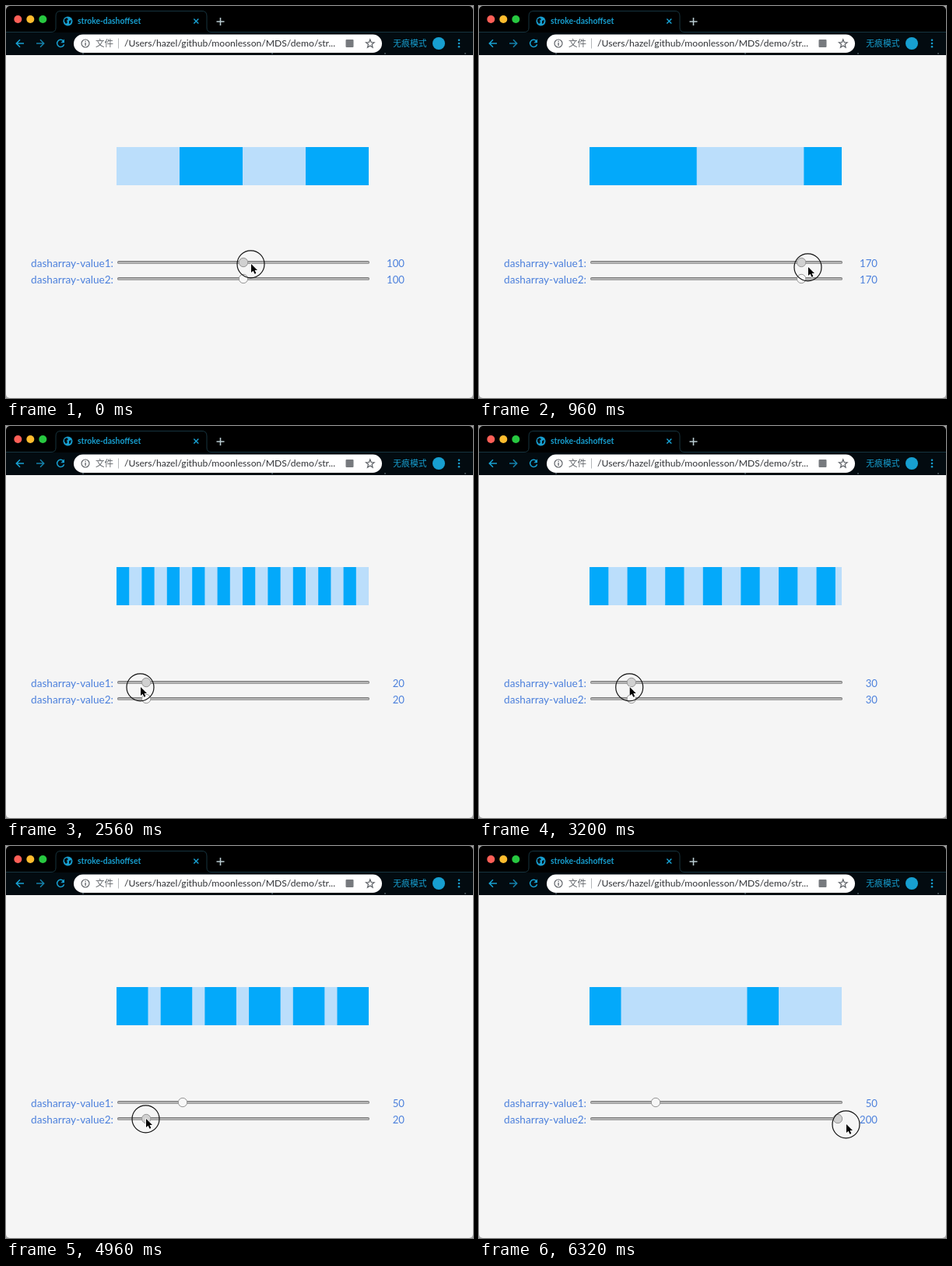
Recreate the animation shown at these times as an HTML page with a canvas. Size 600 by 503 pixels, loop 6400 ms.

```html
<!DOCTYPE html>
<html lang="zh">
<head>
<meta charset="utf-8">
<title>stroke-dashoffset</title>
<style>
html, body { margin: 0; width: 100%; height: 100%; overflow: hidden; background: #aaa; }
canvas { display: block; }
</style>
</head>
<body>
<canvas id="stage" width="600" height="503"></canvas>
<script>
const ctx = document.getElementById('stage').getContext('2d');
const LOOP = 6400, STEP = 80;
const TEAL = '#179fd0', LATIN = 'Lato, "Open Sans", sans-serif';
const CJK = '"Noto Sans CJK SC", "Noto Sans CJK", sans-serif';

// Keyframes: time, then the values at that time
const cursorPath = [
  [0, 315, 331], [960, 423, 335], [1280, 471, 336], [1360, 471, 336],
  [1840, 315, 334], [2560, 173, 335], [2720, 162, 335], [2960, 162, 335],
  [3520, 236, 335], [3840, 229, 342], [4160, 228, 350], [4960, 180, 350],
  [6240, 472, 357], [6400, 472, 357]
];
const dragBoth = [
  [0, 100], [960, 170], [1280, 200], [1360, 200], [1840, 110],
  [2560, 20], [2720, 10], [2960, 10], [3440, 50], [6400, 50]
];
const dragSecond = [[0, 50], [4240, 50], [4960, 20], [6240, 200], [6400, 200]];

function sample(keys, t) {
  const i = Math.max(1, keys.findIndex(k => k[0] >= t));
  const a = keys[i - 1], b = keys[i];
  const p = (t - a[0]) / (b[0] - a[0]);
  return a.slice(1).map((v, n) => v + (b[n + 1] - v) * p);
}

const snap = v => Math.round(v / 10) * 10;

function rect(x, y, w, h, fill) {
  ctx.fillStyle = fill;
  ctx.fillRect(x, y, w, h);
}

function box(x, y, w, h, r, fill) {
  ctx.beginPath();
  ctx.roundRect(x, y, w, h, r);
  ctx.fillStyle = fill;
  ctx.fill();
}

function disc(x, y, r, fill, stroke, width = 1) {
  ctx.beginPath();
  ctx.arc(x, y, r, 0, Math.PI * 2);
  if (fill) { ctx.fillStyle = fill; ctx.fill(); }
  if (stroke) { ctx.strokeStyle = stroke; ctx.lineWidth = width; ctx.stroke(); }
}

function line(d, color, width = 1.5) {
  ctx.strokeStyle = color;
  ctx.lineWidth = width;
  ctx.stroke(new Path2D(d));
}

function text(s, x, y, font, color, align = 'left') {
  ctx.font = font;
  ctx.fillStyle = color;
  ctx.textAlign = align;
  ctx.fillText(s, x, y);
}

function drawTabs() {
  rect(0, 0, 600, 34, '#000');
  rect(0, 34, 600, 29, '#030b10');
  line('M0 33.5H58Q64 33.5 64 28V13Q64 6.5 70 6.5H252Q258 6.5 258 13V28Q258 33.5 264 33.5H600', '#16343f', 1);
  ['#ff5f57', '#febc2e', '#28c840'].forEach((c, i) => disc(15.3 + 16 * i, 17, 5, c));

  disc(79.5, 19.5, 6, TEAL);
  ctx.fillStyle = '#041016';
  ctx.fill(new Path2D('M75 17L78 15L80 17L78 19L79 21L77 23L75 20ZM81 19L84 18L83 22L81 23Z'));
  text('stroke-dashoffset', 92, 23, `bold 10.4px ${LATIN}`, TEAL);
  line('M241.3 16.5L247.3 22.5M247.3 16.5L241.3 22.5', TEAL);
  line('M270.5 20H280.5M275.5 15V25', '#b9cbd1', 1.6);
}

function drawToolbar() {
  line('M23 48H13.5M18 43.3L13.3 48L18 52.7', TEAL);
  line('M39 48H48.5M44 43.3L48.7 48L44 52.7', '#147fa8');
  line('M73.8 45A4.6 4.6 0 1 0 74.6 49.3', TEAL);
  ctx.fillStyle = TEAL;
  ctx.fill(new Path2D('M75 42.5V47.2H70.3Z'));

  box(87, 36.5, 396, 23.5, 11.75, '#fff');
  disc(102, 48, 5, null, '#5f6368', 1.2);
  rect(101.4, 47, 1.3, 4, '#5f6368');
  rect(101.4, 44.8, 1.3, 1.3, '#5f6368');
  text('文件', 115, 52.3, `11.5px ${CJK}`, '#5f6368');
  rect(144, 41.5, 1, 13, '#b5b7ba');
  text('/Users/hazel/github/moonlesson/MDS/demo/str...', 152, 52.2, `12.15px ${LATIN}`, '#303236');
  box(436.5, 43, 10, 10, 1, '#777a7e');

  ctx.beginPath();
  for (let i = 0; i < 10; i++) {
    const r = i % 2 ? 2.4 : 5.6, a = -Math.PI / 2 + i * Math.PI / 5;
    ctx.lineTo(467.8 + r * Math.cos(a), 48.5 + r * Math.sin(a));
  }
  ctx.closePath();
  ctx.strokeStyle = '#5f6368';
  ctx.lineWidth = 1.2;
  ctx.stroke();

  text('无痕模式', 497.3, 52, `10.8px ${CJK}`, TEAL);
  disc(556, 48, 8, TEAL);
  [43.7, 48, 52.3].forEach(y => disc(582, y, 1.3, TEAL));
  [[99, 61], [342, 61], [487, 61], [590, 61]].forEach(([x, y]) => disc(x, y, 0.8, '#83949b'));
}

function drawDashes(on, off, shift) {
  const x = 142, w = 324, unit = 0.81;
  rect(x, 181, w, 49, '#bbdefb');
  for (let pos = -shift * unit; pos < w; pos += (on + off) * unit) {
    const start = Math.max(0, pos), end = Math.min(w, pos + on * unit);
    if (end > start) rect(x + start, 181, end - start, 49, '#03a9fa');
  }
}

function drawSlider(label, y, value, pressed) {
  const font = `13.6px ${LATIN}`, blue = '#4c80dc';
  text(label, 138, y + 6, font, blue, 'right');
  text(value, 512, y + 6, `13.2px ${LATIN}`, blue, 'right');
  box(143, y - 2, 324, 4, 2, '#7d7d7d');
  box(144, y - 0.8, 322, 2.2, 1, '#b9b9b9');
  disc(149 + value * 1.56, y, 5.7, pressed ? '#d0d0d0' : '#f7f7f7', '#969696');
}

function drawCursor(x, y, pressed) {
  if (pressed) disc(x - 0.5, y + 0.3, 17.5, null, '#111', 1.2);
  ctx.save();
  ctx.translate(x, y);
  const arrow = new Path2D('M0 0V11L2.6 8.7L4.5 12.8L6.4 12L4.6 8H8Z');
  ctx.lineJoin = 'round';
  ctx.strokeStyle = '#fff';
  ctx.lineWidth = 1.6;
  ctx.stroke(arrow);
  ctx.fillStyle = '#000';
  ctx.fill(arrow);
  ctx.restore();
}

function draw(t) {
  const first = snap(sample(dragBoth, t)[0]);
  const second = t < 3600 ? first : snap(sample(dragSecond, t)[0]);
  const [x, y] = sample(cursorPath, t);
  const onFirst = t < 3600, onSecond = t >= 4160;

  ctx.clearRect(0, 0, 600, 503);
  ctx.save();
  ctx.beginPath();
  ctx.roundRect(0, 0, 600, 503, 5);
  ctx.clip();
  rect(0, 0, 600, 503, '#f5f5f5');
  drawTabs();
  drawToolbar();
  drawDashes(first, second, t < STEP ? 100 : 0);
  drawSlider('dasharray-value1:', 329, first, onFirst);
  drawSlider('dasharray-value2:', 350, second, onSecond);
  drawCursor(x, y, onFirst || onSecond);
  ctx.restore();
}

const begin = performance.now();
function tick() {
  const t = (performance.now() - begin) % LOOP;
  draw(Math.floor(t / STEP) * STEP);
  requestAnimationFrame(tick);
}
tick();
</script>
</body>
</html>
```
